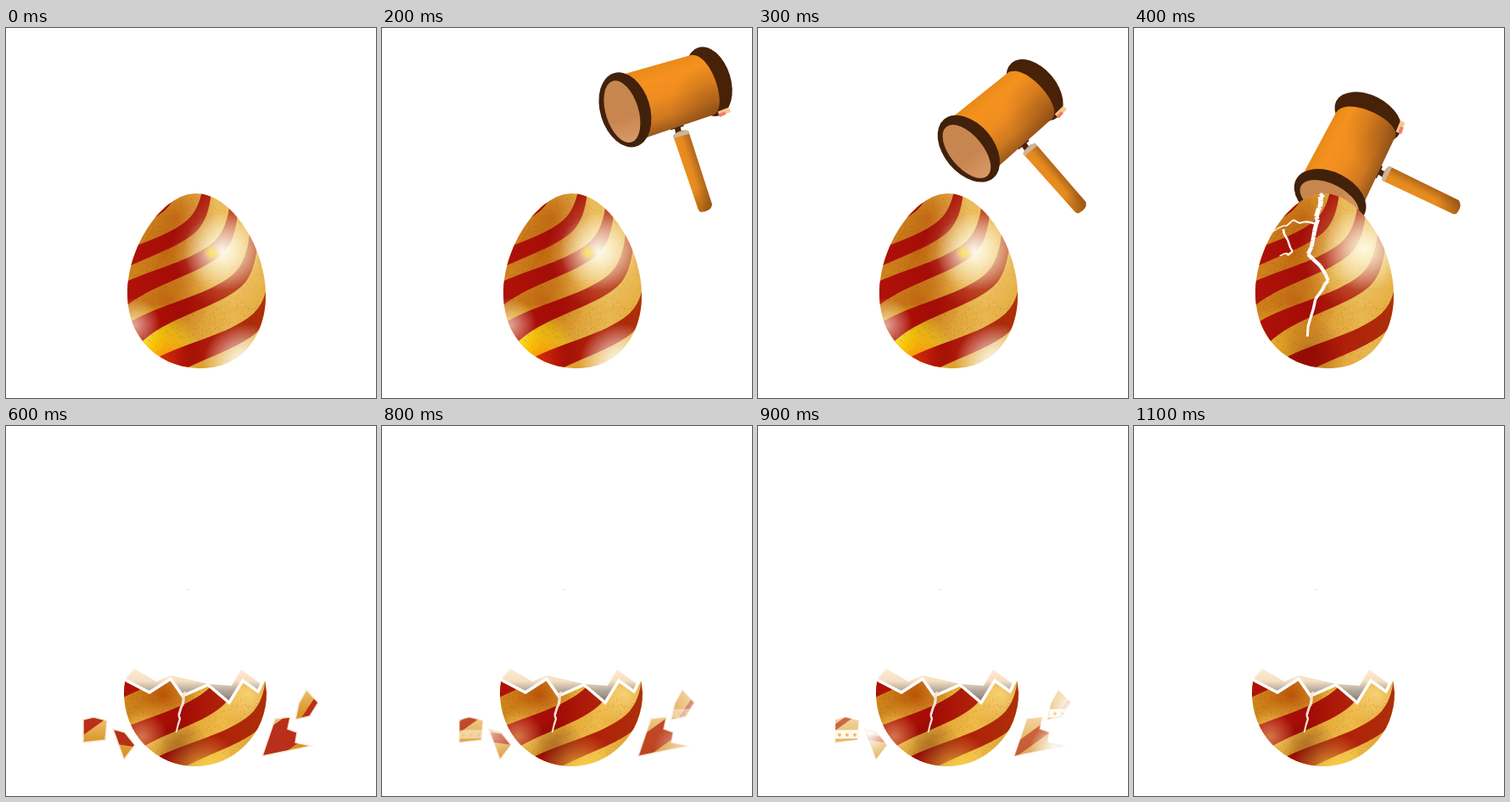
An HTML page with a canvas that plays this animation: 436x436 px, repeating every 3.1 s.

```html
<!DOCTYPE html>
<html>
<head>
<meta charset="utf-8">
<style>
  html, body { margin: 0; width: 100%; height: 100%; overflow: hidden; background: #fff; }
  canvas { display: block; width: 436px; height: 436px; }
</style>
</head>
<body>
<canvas id="stage" width="436" height="436"></canvas>
<script>
const ctx = document.getElementById('stage').getContext('2d');
const LOOP = 3100;

function seeded(seed) {
  return () => (seed = seed * 16807 % 2147483647) / 2147483647;
}

function fillWith(stops, gradient) {
  stops.forEach(([at, color]) => gradient.addColorStop(at, color));
  return gradient;
}
const linear = (x0, y0, x1, y1, ...stops) => fillWith(stops, ctx.createLinearGradient(x0, y0, x1, y1));

function glow(x, y, r, rgb, alpha) {
  ctx.fillStyle = fillWith([[0, `rgba(${rgb},${alpha})`], [.35, `rgba(${rgb},${alpha * .65})`], [1, `rgba(${rgb},0)`]],
    ctx.createRadialGradient(x, y, 0, x, y, r));
  ctx.fillRect(x - r, y - r, 2 * r, 2 * r);
}

function polygon(points) {
  const path = new Path2D();
  points.forEach(([x, y]) => path.lineTo(x, y));
  path.closePath();
  return path;
}

function line(points, width, color) {
  ctx.beginPath();
  points.forEach(([x, y]) => ctx.lineTo(x, y));
  ctx.strokeStyle = color;
  ctx.lineWidth = width;
  ctx.stroke();
}

function ellipse(x, y, rx, ry, fill) {
  ctx.beginPath();
  ctx.ellipse(x, y, rx, ry, 0, 0, 2 * Math.PI);
  ctx.fillStyle = fill;
  ctx.fill();
}

function inside(path, draw) {
  ctx.save();
  ctx.clip(path);
  draw();
  ctx.restore();
}

// A swirl stripe: one S-curve around a knee, and the same curve shifted by (dx, dy)
function stripe([x, y, dx = 9, dy = 15], sag = 12) {
  const path = new Path2D();
  path.moveTo(x - 120, y + 56);
  path.bezierCurveTo(x - 90, y + 36, x - 30, y + 26, x, y);
  path.bezierCurveTo(x + 12, y - 11, x + 17, y - 28, x + 19, y - 48);
  x += dx;
  y += dy;
  path.lineTo(x + 19, y - 48);
  path.bezierCurveTo(x + 17, y - 28, x + 12, y - 11, x, y);
  path.bezierCurveTo(x - 30, y + 26, x - 90, y + 36, x - 120, y + 56 + sag);
  path.closePath();
  return path;
}

const grain = new Path2D();
const random = seeded(7);
for (let i = 0; i < 1500; i++) {
  grain.rect(140 + 165 * random() ** 1.3, 200 + 190 * random(), 1, 1);
}

function addGrain() {
  ctx.fillStyle = 'rgba(120,35,0,.22)';
  ctx.fill(grain);
}

function paintStripes(stripes) {
  ctx.fillStyle = linear(143, 0, 306, 0, [0, '#b01209'], [.4, '#a30c06'], [.65, '#b0200a'], [1, '#ac3009']);
  stripes.forEach(path => ctx.fill(path));
}

const eggShape = new Path2D(
  'M224 195C266 195 306 260 306 315C306 366 274 401 230 401C180 401 143 365 143 312C143 258 184 195 224 195Z');
const eggStripes = [[178, 200], [214, 226], [245, 252], [268, 290], [291, 337, 4, 22]].map(knee => stripe(knee));

function egg(cracked) {
  inside(eggShape, () => {
    ctx.fillStyle = linear(143, 300, 306, 270, [0, '#cf841c'], [.4, '#dda032'], [.7, '#e9b750'], [1, '#e3a735']);
    ctx.fillRect(140, 190, 170, 215);
    [[190, 268], [190, 322], [200, 223]].forEach(([x, y]) => glow(x, y, 52, '185,88,8', .75));
    glow(170, 382, 58, cracked ? '235,180,40' : '255,248,0', 1);
    paintStripes(eggStripes);
    addGrain();
    glow(270, 260, 75, '255,235,180', .5);
    if (cracked) {
      glow(272, 260, 50, '255,252,230', .95);
      glow(205, 385, 45, '110,10,0', .35);
    } else {
      glow(185, 390, 36, '255,70,10', .5);
      glow(150, 350, 32, '255,235,215', .7);
      glow(255, 263, 46, '255,255,240', .95);
      glow(242, 265, 10, '255,240,80', .8);
      glow(280, 396, 48, '255,255,250', 1);
    }
  });
}

// A jagged line through a few points that thins toward its end
function crack(points, width, color = '#fff') {
  const jitter = seeded(31);
  const last = points.length - 1;
  let from = points[0];
  for (let step = 1; step <= last * 4; step++) {
    const i = Math.min(Math.floor(step / 4), last - 1), t = step / 4 - i;
    const to = points[i].map((p, axis) => p + (points[i + 1][axis] - p) * t + (jitter() - .5) * 4);
    line([from, to], width * (1 - .5 * step / (last * 4)), color);
    from = to;
  }
}

function eggCracks() {
  crack([[223, 196], [218, 214], [212, 240], [206, 265], [230, 297], [213, 320], [204, 364]], 6);
  crack([[215, 231], [188, 228], [162, 241]], 2.5);
  crack([[176, 237], [187, 265], [171, 269]], 3);
}

const PIVOT = [380, 213];

function hammer(degrees) {
  ctx.save();
  ctx.translate(...PIVOT);
  ctx.rotate(degrees * Math.PI / 180);
  ctx.translate(-PIVOT[0], -PIVOT[1]);

  line([[345, 108], [348, 118]], 16, '#452411');
  line([[348, 116], [350, 126]], 7, '#452411');
  const handle = new Path2D('M343 127Q350 119 361 121L389 208Q388 216 376 217Q373 216 372 212Z');
  ctx.fillStyle = linear(349, 167, 375, 159, [0, '#ee901f'], [.55, '#e58a20'], [1, '#a66018']);
  ctx.fill(handle);
  inside(handle, () => {
    glow(382, 215, 28, '105,55,10', .5);
    line([[341, 128], [362, 122]], 5, '#cbb5a0');
  });

  ctx.translate(340, 80);
  ctx.rotate(-17 * Math.PI / 180);
  ellipse(48, -3, 26, 42, '#482109');
  line([[48, 37], [62, 36]], 6, '#f5c98d');
  line([[48, 39], [56, 38]], 4, '#f57c68');
  const body = new Path2D('M-56 -41L36 -39C61 -37 62 34 42 36L-56 39Z');
  ctx.fillStyle = linear(0, -41, 0, 39, [0, '#e88917'], [.2, '#f5921f'], [.5, '#ee8c20'], [.78, '#cf7820'], [1, '#985719']);
  ctx.fill(body);
  inside(body, () => glow(48, 30, 55, '115,60,15', .45));
  ellipse(-56, 0, 29.3, 45.2, '#42210b');
  ellipse(-60, 1, 19.3, 37.7, linear(-60, -37, -60, 39, [0, '#c8874f'], [.6, '#c88550'], [1, '#d89a68']));
  ctx.restore();
}

const rim = [[140, 299], [169, 314], [194, 298], [208, 318], [238, 305], [263, 326], [279, 300], [297, 313], [305, 297]];
const backRim = [[151, 286], [177, 301], [195, 294], [238, 304], [266, 306], [277, 287], [299, 303]];
const shellShape = polygon(rim);
const bowl = new Path2D();
bowl.ellipse(223, 315, 84, 86, 0, 0, 2 * Math.PI);
const shellStripes = [[140, 275, 42, 20], [237, 311, 18, 19], [288, 340, 10, 17]].map(knee => stripe(knee));

function shell() {
  ctx.fillStyle = linear(0, 288, 0, 324, [0, '#ffe9d0'], [.35, '#f6dec2'], [.65, '#b5aa9b'], [1, '#857a6c']);
  ctx.fill(polygon([...backRim, ...rim.slice(0, -1).reverse()]));

  inside(polygon([...rim, [320, 420], [125, 420]]), () => inside(bowl, () => {
    ctx.fillStyle = linear(140, 330, 306, 340, [0, '#cf841a'], [.4, '#e0a42f'], [.7, '#efba48'], [1, '#dda033']);
    ctx.fillRect(130, 290, 180, 115);
    glow(185, 316, 45, '182,78,5', .9);
    glow(178, 365, 42, '255,220,90', .5);
    glow(285, 316, 36, '255,225,140', .7);
    paintStripes(shellStripes);
    addGrain();
    glow(205, 380, 35, '90,8,0', .45);
    glow(160, 366, 30, '255,220,140', .5);
    glow(230, 405, 45, '255,225,80', .65);
  }));
  line(rim, 3.5, '#fff');
  crack([[212, 314], [207, 332], [200, 361]], 4, '#f3e6d8');
  ctx.fillStyle = '#f3e6cc';
  ctx.fillRect(213, 192, 4, 1);
}

// streak: a red diagonal and its width; band: height of the dotted strip; haze: centre of the white fade
const shards = [
  { shape: [[91, 346], [103, 343], [119, 347], [117, 370], [91, 373]], streak: [[84, 360], [112, 340]], width: 15, band: 364 },
  { shape: [[126, 357], [140, 361], [152, 376], [139, 393]], streak: [[124, 366], [152, 370]], width: 16, haze: [130, 362] },
  { shape: [[317, 345], [335, 343], [332, 357], [343, 361], [341, 373], [360, 377], [302, 389]],
    streak: [[295, 388], [345, 352]], width: 34, haze: [350, 380] },
  { shape: [[354, 311], [368, 326], [358, 342], [341, 346], [345, 327]], streak: [[352, 346], [368, 322]], width: 9, band: 339, haze: [368, 332] }
];

function drawShards(fade) {
  ctx.save();
  shards.forEach(({ shape, streak, width, band, haze }) => {
    const path = polygon(shape);
    inside(path, () => {
      const [x, y] = shape[0];
      ctx.globalAlpha = 1 - fade * .3;
      ctx.fillStyle = linear(x, y, x, y + 40, [0, '#edbd70'], [.6, '#dc9a2c'], [1, '#d28c20']);
      ctx.fill(path);
      ctx.globalAlpha = 1 - fade * .35;
      line(streak, width * (1 - .6 * fade), '#b8301a');
      ctx.globalAlpha = fade;
      if (band) {
        line([[x - 20, band], [x + 30, band - 1]], 10, '#fffaf0');
        for (let dx = -13; dx < 30; dx += 9) ellipse(x + dx, band, 2, 2, '#edc06a');
      }
      if (haze) glow(...haze, 30, '255,255,255', 1);
    });
    ctx.globalAlpha = 1 - fade * .6;
    ctx.lineWidth = 1.5;
    ctx.strokeStyle = '#f8e8d5';
    ctx.stroke(path);
  });
  ctx.restore();
}

const SWING_START = 200, STRIKE = 400, BURST = 600, FADE = 800, GONE = 1100;

function draw(time) {
  ctx.clearRect(0, 0, 436, 436);
  const beat = Math.floor(time / 100) * 100;
  if (time < BURST) {
    const struck = time >= STRIKE;
    if (time >= SWING_START && time < STRIKE + 100) hammer(-46 * (beat - SWING_START) / (STRIKE - SWING_START));
    egg(struck);
    if (struck) eggCracks();
  } else {
    shell();
    if (time < GONE) drawShards(Math.min(1, Math.max(0, (beat - FADE + 100) / 200)));
  }
}

const start = performance.now();
function tick() {
  draw((performance.now() - start) % LOOP);
  requestAnimationFrame(tick);
}
tick();
</script>
</body>
</html>
```
